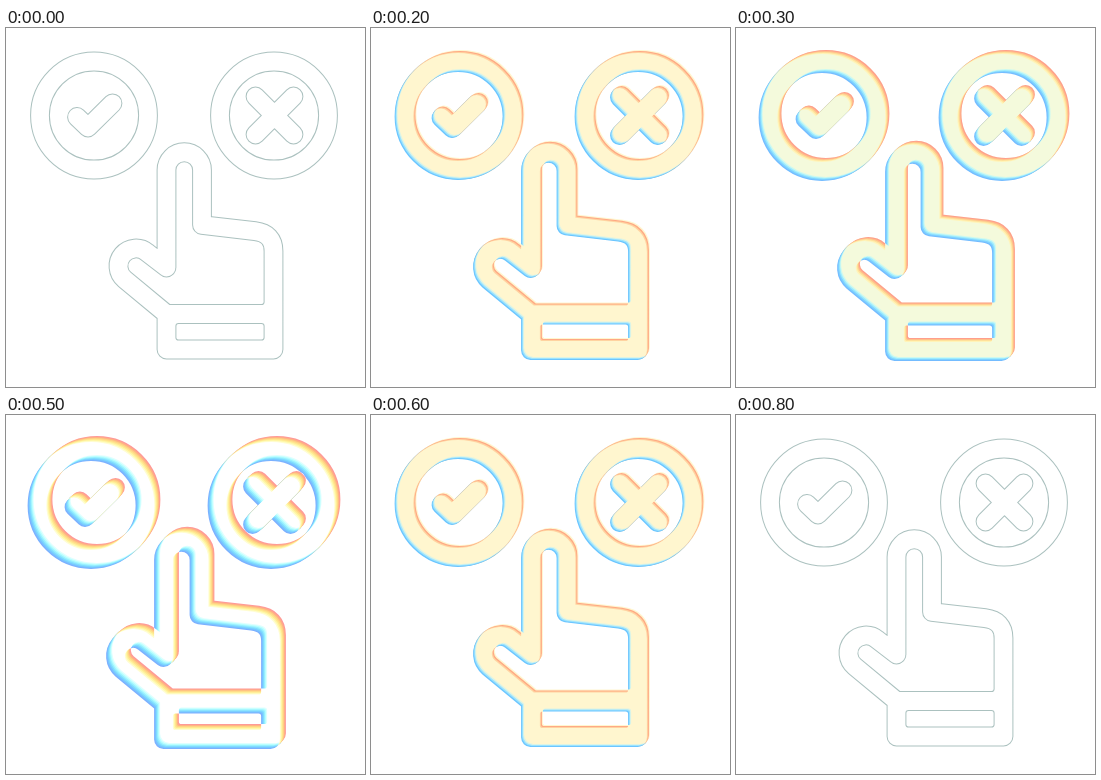
Write an HTML page with a canvas that moves like this. It is 359x359 px and loops after 0.9 s.

```html
<!DOCTYPE html>
<html lang="en">
<head>
<meta charset="utf-8">
<title>Choice</title>
<style>
  html, body { margin: 0; width: 100%; height: 100%; overflow: hidden; background: #fff; }
  canvas { display: block; width: 100vw; height: 100vh; }
</style>
</head>
<body>
<canvas id="stage" width="359" height="359"></canvas>
<script>
const SIZE = 359;
const STEP = 100;
const WIDTH = 18.8;

// The last two lines soften the inner corners of the cuff and palm.
const icon = new Path2D(`
  M34 87.5a54 54 0 1 1 108 0a54 54 0 1 1 -108 0Z
  M214 87.5a54 54 0 1 1 108 0a54 54 0 1 1 -108 0Z
  M71 89L82 99.5L106.5 75.3
  M249.5 68.5L287.5 106.5M287.5 68.5L249.5 106.5
  M160.5 239.5V142a17.75 17.75 0 0 1 35.5 0V197L249 203.2
  Q267.5 205.5 267.5 223V321.5H160.5V286L118.7 251.4
  A17.5 17.5 0 0 1 141.3 224.6L160.5 239.5
  M160.5 286H267.5M267.5 274a12 12 0 0 1 -12 12
  M172.5 286H255.5a12 12 0 0 1 12 12V309.5a12 12 0 0 1 -12 12H172.5a12 12 0 0 1 -12 -12V298a12 12 0 0 1 12 -12Z`);

// reach: how far the outermost colour slides along the diagonal.
// warm and cool run from the outer edge towards the fill.
const looks = {
  line: { reach: 0, fill: '#ffffff', warm: [], cool: [] },
  faint: { reach: 0.5, fill: '#ffeccb', warm: ['#ffc49c'], cool: ['#a5dcf8'] },
  cream: {
    reach: 1, fill: '#fff6cf',
    warm: ['#ffa984', '#ffd3a0'],
    cool: ['#6cc6ff', '#9be3ff', '#dcf4e6']
  },
  lime: {
    reach: 2, fill: '#f4fadc',
    warm: ['#ff9f8c', '#ffc08a', '#ffe09a', '#fff4b8'],
    cool: ['#74bcff', '#7fd2ff', '#9cebff', '#cdf9f0']
  },
  pale: {
    reach: 2.5, fill: '#fbfdf0',
    warm: ['#ff9c92', '#ffbc86', '#ffdc8c', '#fff0a4', '#fffac8'],
    cool: ['#78b6ff', '#7acdff', '#8ae6ff', '#b0fbff', '#dcfffa']
  },
  white: {
    reach: 3, fill: '#ffffff',
    warm: ['#ff9a98', '#ffb482', '#ffd286', '#ffe88e', '#fff8a8', '#fffdd2'],
    cool: ['#7cb0ff', '#78c6ff', '#80dcff', '#98f0ff', '#b8ffff', '#deffff']
  }
};
const order = ['line', 'faint', 'cream', 'lime', 'pale', 'white', 'cream', 'faint', 'line'];

const ctx = document.getElementById('stage').getContext('2d');
const rimCanvas = document.createElement('canvas');
rimCanvas.width = rimCanvas.height = SIZE;
const rim = rimCanvas.getContext('2d');
for (const c of [ctx, rim]) c.lineCap = c.lineJoin = 'round';

function stamp(c, color, shift = 0, width = WIDTH) {
  c.save();
  c.translate(shift, -shift);
  c.lineWidth = width;
  c.strokeStyle = color;
  c.stroke(icon);
  c.restore();
}

function drawLook({ reach, fill, warm, cool }) {
  ctx.fillStyle = '#fff';
  ctx.fillRect(0, 0, SIZE, SIZE);
  stamp(ctx, '#abc1bf', 0, WIDTH + 1);
  if (!warm.length) {
    stamp(ctx, fill, 0, WIDTH - 1);
    return;
  }

  cool.forEach((color, i) => stamp(ctx, color, i - reach));
  stamp(ctx, fill, cool.length - reach);

  // The warm rim keeps only what the fill does not reach.
  rim.clearRect(0, 0, SIZE, SIZE);
  warm.forEach((color, i) => stamp(rim, color, reach - i));
  rim.globalCompositeOperation = 'destination-out';
  stamp(rim, '#000', reach - warm.length);
  rim.globalCompositeOperation = 'source-over';
  ctx.drawImage(rimCanvas, 0, 0);
}

let shown = '';
function tick() {
  const name = order[Math.floor(performance.now() / STEP) % order.length];
  if (name !== shown) drawLook(looks[shown = name]);
  requestAnimationFrame(tick);
}
tick();
</script>
</body>
</html>
```
